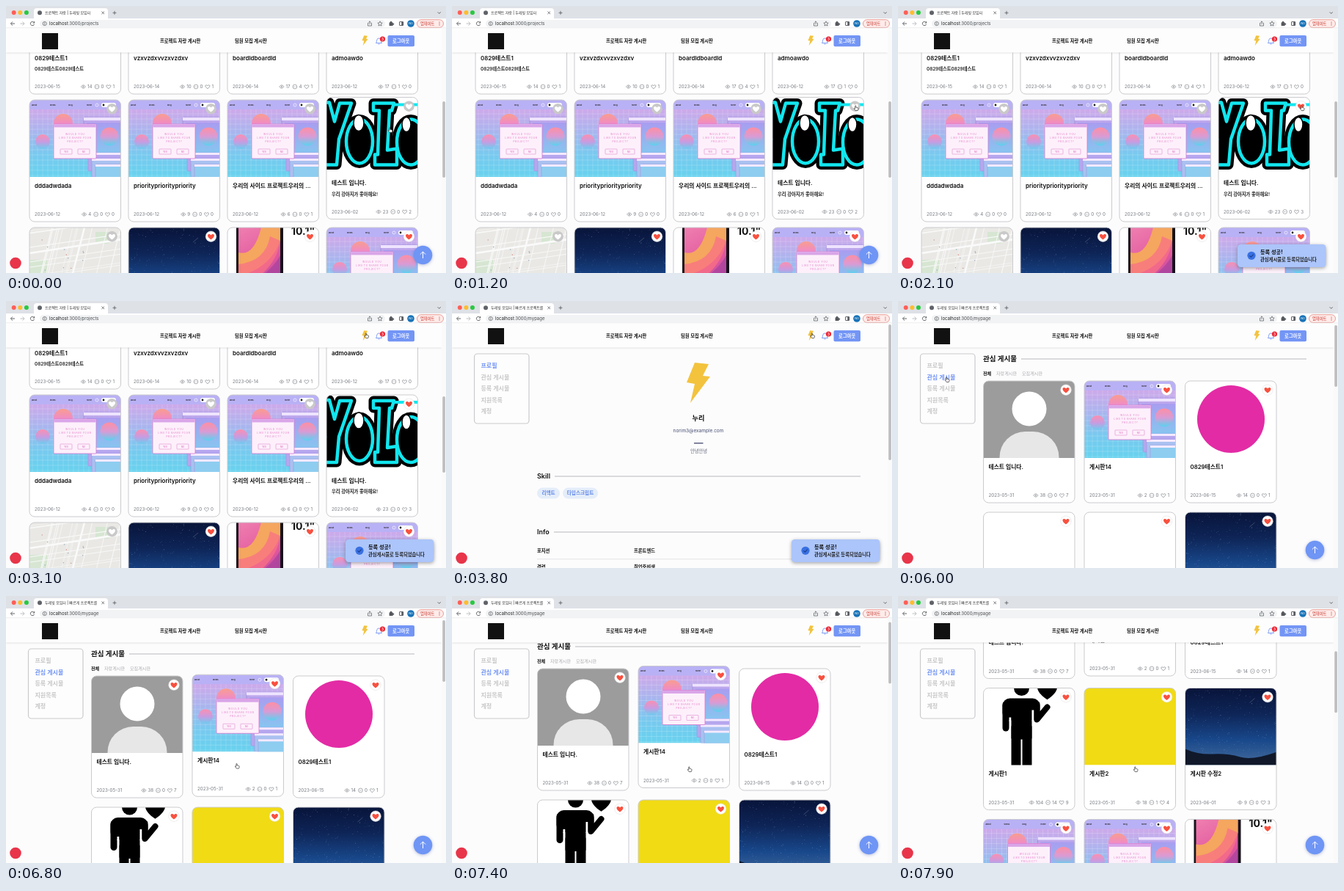
Write an HTML page with a canvas that moves like this. It is 600 by 364 pixels and loops after 8000 ms.

```html
<!DOCTYPE html>
<html lang="ko">
<head>
<meta charset="utf-8">
<title>프로젝트 자랑</title>
<style>
html, body { margin: 0; width: 100%; height: 100%; overflow: hidden; background: #fff; }
canvas { display: block; width: 600px; height: 364px; }
</style>
</head>
<body>
<canvas id="stage"></canvas>
<script>
const canvas = document.getElementById('stage');
const ratio = window.devicePixelRatio || 1;
canvas.width = 600 * ratio;
canvas.height = 364 * ratio;
const c = canvas.getContext('2d');
const FONT = 'Inter, "Noto Sans CJK KR", "Noto Sans CJK", sans-serif';
const BRAND = '두레빛 모임터';
const BLUE = '#7395f5', BORDER = '#cbcbce', INK = '#111', RED = '#f9503f';
const LOOP = 8000, LIKE = 1300, TO_PROFILE = 3500, TO_LIKES = 5500, LOADED = 6200;

// Drawing helpers
function text(s, x, y, size, color = INK, weight = 400, align = 'left') {
  c.font = `${weight} ${size}px ${FONT}`;
  c.textAlign = align;
  c.fillStyle = color;
  c.fillText(s, x, y + size * 0.36);
  return c.measureText(s).width;
}
function paint(fill, stroke, width = 1) {
  if (fill) { c.fillStyle = fill; c.fill(); }
  if (stroke) { c.strokeStyle = stroke; c.lineWidth = width; c.stroke(); }
}
function rect(x, y, w, h, fill) { c.fillStyle = fill; c.fillRect(x, y, w, h); }
function box(x, y, w, h, r, fill, stroke, width) {
  c.beginPath();
  c.roundRect(x, y, w, h, r);
  paint(fill, stroke, width);
}
function disc(x, y, r, fill, stroke, width) { oval(x, y, r, r, fill, stroke, width); }
function oval(x, y, rx, ry, fill, stroke, width) {
  c.beginPath();
  c.ellipse(x, y, rx, ry, 0, 0, Math.PI * 2);
  paint(fill, stroke, width);
}
function path(d, fill, stroke, width) {
  const p = new Path2D(d);
  if (fill) { c.fillStyle = fill; c.fill(p); }
  if (stroke) { c.strokeStyle = stroke; c.lineWidth = width || 1; c.stroke(p); }
}
function at(x, y, scale, draw) {
  c.save();
  c.translate(x, y);
  c.scale(scale, scale);
  draw();
  c.restore();
}
function gradient(y0, y1, colors, x0 = 0, x1 = 0) {
  const g = c.createLinearGradient(x0, y0, x1, y1);
  colors.forEach((color, i) => g.addColorStop(i / (colors.length - 1), color));
  return g;
}
function shadow(blur, color, dy, draw) {
  c.save();
  c.shadowBlur = blur * ratio;
  c.shadowColor = color;
  c.shadowOffsetY = dy * ratio;
  draw();
  c.restore();
}
function random(seed) {
  return () => (seed = (seed * 16807) % 2147483647) / 2147483647;
}
function heart(x, y, s, fill, stroke) {
  at(x, y, s, () => path('M0 .9C-2 -.4 -.9 -1.6 0 -.6C.9 -1.6 2 -.4 0 .9Z', fill, stroke, 0.7 / s));
}
function bolt(x, y, s) {
  at(x, y, s, () => path('M-5-27L14-25L6-9L16-8L-11 28L-5 2L-16 0Z', '#f3c33e'));
}

// Thumbnails, drawn in a 125 x 105 area
function synth() {
  rect(0, 0, 125, 105, gradient(12, 105, ['#cfa9ea', '#a9b5ee', '#78c9ef', '#67d2ee']));
  c.beginPath();
  for (let x = 4; x < 125; x += 7) { c.moveTo(x, 13); c.lineTo(x, 105); }
  for (let y = 19; y < 105; y += 7) { c.moveTo(0, y); c.lineTo(125, y); }
  paint(null, 'rgba(255,255,255,.34)', 0.5);
  rect(0, 0, 125, 13, '#b9b1f5');
  ['about', 'works', 'blog', 'home'].forEach((s, i) => text(s, 3 + i * 25, 7, 2.6, '#222', 600));
  disc(92, 7, 2, null, '#fff', 0.6);
  box(98, 4, 20, 6, 3, '#fff');
  disc(101, 7, 1.4, '#222');
  disc(46, 32, 13, gradient(19, 45, ['#f99d8e', '#f08cc4', '#83a9ee']));
  disc(18, 57, 10, gradient(47, 67, ['#fc8fb0', '#c99be0', '#6bcdf0']));
  box(74, 24, 55, 54, 1, 'rgba(190,164,237,.75)', '#9a7fd8', 0.7);
  rect(74, 24, 55, 4, '#eee4ff');
  rect(78, 31, 47, 43, gradient(31, 74, ['#a99df0', '#85c7f0']));
  disc(109, 50, 12.5, gradient(38, 62, ['#fc8fa5', '#d99bd5', '#5fd0ee']));
  for (let i = 0; i < 3; i++) {
    box(80 + i * 5, 72 + i * 8, 50, 25, 1, ['#b6a6ee', '#a9c1f0', '#8ecdf0'][i], '#a08ade', 0.5);
    rect(80 + i * 5, 72 + i * 8, 50, 3, '#f5eaff');
  }
  box(33, 33, 58, 47, 1, '#fdf0fb', '#d977cf', 0.8);
  rect(33.4, 33.4, 57.2, 4, '#d9a5e8');
  ['W O U L D   Y O U', 'L I K E  T O  S H A R E  Y O U R', 'P R O J E C T ?'].forEach((s, i) =>
    text(s, 62, 47 + i * 5, 3, '#e06fc0', 400, 'center'));
  [['YES', 42], ['NO', 66]].forEach(([s, x]) => {
    box(x, 67, 16, 7, 0.5, null, '#df8bcd', 0.6);
    text(s, x + 8, 70.5, 2.8, '#d95bb6', 400, 'center');
  });
}
function yolo() {
  rect(0, 0, 125, 105, '#fff');
  const letters = [
    'M-14 7H4L11 33L18 8H34L17 57L14 92H-6L-2 57Z',
    'M45 30A18 30 0 1 0 45 90A18 30 0 1 0 45 30Z',
    'M64 8H92L89 18H86L83 72L96 70V92H66V78H70L72 18H64Z',
    'M115 30A19 31 0 1 0 115 92A19 31 0 1 0 115 30Z'
  ];
  c.lineJoin = 'round';
  letters.forEach(d => path(d, '#000', '#000', 13));
  letters.forEach(d => path(d, '#000', '#12e6ee', 4.5));
  path('M92 10H127', null, '#12e6ee', 4);
  c.lineJoin = 'miter';
  oval(44, 35, 7, 11, '#fff', '#000', 1.5);
  oval(109, 37, 6, 10, '#fff', '#000', 1.5);
}
function map() {
  rect(0, 0, 125, 105, '#e9e8e5');
  [[0, 44, 24, 34], [90, 6, 18, 16], [64, 64, 18, 26]].forEach(b => rect(...b, '#d6e6d2'));
  const rnd = random(31);
  for (let i = 0; i < 14; i++) {
    const x = rnd() * 140, y = rnd() * 105;
    path(`M${x} 0L${x - 25} 105M0 ${y}L125 ${y - 18}`, null, '#f8f8f7', 0.5 + rnd() * 0.7);
  }
  path('M75 0L48 105M0 35L125 16', null, '#fafafa', 2.5);
  for (let i = 0; i < 18; i++) disc(rnd() * 125, rnd() * 105, 0.8, i % 3 ? '#9fb0be' : '#d69b8f');
}
function night() {
  rect(0, 0, 125, 105, gradient(0, 105, ['#08143a', '#0e2557', '#18478a', '#446b9c']));
  const rnd = random(77);
  for (let i = 0; i < 260; i++) {
    const size = 0.3 + rnd() * 0.4;
    rect(rnd() * 125, rnd() * 88, size, size, `rgba(205,224,255,${0.2 + rnd() * 0.5})`);
  }
  path('M88 20L95 14', null, 'rgba(255,255,255,.4)', 0.5);
  path('M0 83Q18 91 38 90T75 94T125 87V105H0Z', '#10182a');
}
function tablet() {
  rect(0, 0, 125, 105, '#fff');
  box(12, -8, 64, 130, 3, '#17141c');
  rect(15, 0, 57, 105, gradient(0, 105, ['#ef7fb0', '#e0559c', '#8f4aa8'], 15, 72));
  path('M15 34Q36 40 46 0H72V18Q58 56 15 66Z', '#f5a65f');
  path('M15 50Q52 46 58 12L72 18Q66 60 15 84Z', 'rgba(250,112,132,.75)');
  path('M15 84Q56 66 72 38V105H15Z', 'rgba(160,62,158,.6)');
  text('10.1"', 87, 5, 14, '#111', 700);
}
function person() {
  rect(0, 0, 125, 105, '#9c9c9c');
  disc(62.5, 38, 23.5, '#fff');
  box(22, 69, 81, 70, 37, '#e7e7e7');
}
function donor() {
  rect(0, 0, 125, 105, '#fff');
  disc(52, 0, 10.5, '#000');
  box(26, 14, 51, 30, 10, '#000');
  box(26, 18, 9, 41, 4.5, '#000');
  rect(35, 40, 3, 5, '#fff');
  box(38, 25, 28, 45, 2, '#000');
  box(38, 50, 13, 70, 3, '#000');
  box(53, 50, 13, 70, 3, '#000');
  rect(66, 30, 3, 15, '#fff');
  c.lineCap = c.lineJoin = 'round';
  path('M73 22V43L87 26', null, '#000', 8);
  c.lineCap = 'butt';
  c.lineJoin = 'miter';
  heart(87, 5, 12, '#000');
}
function magenta() {
  rect(0, 0, 125, 105, '#fff');
  disc(62.5, 52, 46, '#e32ba5');
}
function yellow() { rect(0, 0, 125, 105, '#f1db14'); }

// Cards: title, description, date, [views, comments, likes], thumbnail, liked
const PROJECTS = [
  ['0829테스트1', '0829테스트0829테스트', '2023-06-15', [14, 0, 1], null, false],
  ['vzxvzdxvvzxvzdxv', '', '2023-06-14', [10, 0, 1], null, false],
  ['boardldboardld', '', '2023-06-14', [17, 4, 1], null, false],
  ['admoawdo', '', '2023-06-12', [17, 1, 0], null, false],
  ['dddadwdada', '', '2023-06-12', [4, 0, 0], synth, false],
  ['priorityprioritypriority', '', '2023-06-12', [9, 0, 0], synth, false],
  ['우리의 사이드 프로젝트우리의 ...', '', '2023-06-12', [6, 0, 1], synth, false],
  ['테스트 입니다.', '우리 강아지가 좋아해요!', '2023-06-02', [23, 0, 2], yolo, false],
  ['', '', '', [], map, false], ['', '', '', [], night, true],
  ['', '', '', [], tablet, true], ['', '', '', [], synth, true]
];
const LIKED = [
  ['테스트 입니다.', '', '2023-05-31', [38, 0, 7], person, true],
  ['게시판14', '', '2023-05-31', [2, 0, 1], synth, true],
  ['0829테스트1', '', '2023-06-15', [14, 0, 1], magenta, true],
  ['게시판1', '', '2023-05-31', [104, 14, 9], donor, true],
  ['게시판2', '', '2023-05-31', [18, 1, 4], yellow, true],
  ['게시판 수정2', '', '2023-06-01', [9, 0, 3], night, true],
  ['', '', '', [], synth, true], ['', '', '', [], synth, true], ['', '', '', [], tablet, true]
];
const GRAY = '#777b82';
const statIcons = [
  (x, y) => at(x, y, 1, () => {
    path('M-3.2 0Q0 -4.4 3.2 0Q0 4.4 -3.2 0Z', null, GRAY, 0.6);
    disc(0, 0, 0.9, null, GRAY, 0.6);
  }),
  (x, y) => {
    disc(x, y, 2.9, null, GRAY, 0.6);
    for (let i = -1; i < 2; i++) disc(x + i * 1.3, y, 0.4, GRAY);
  },
  (x, y) => heart(x, y + 0.3, 2.6, null, GRAY)
];
function card(x, y, [title, note, date, stats, thumb, liked]) {
  c.save();
  box(x, y, 124.5, 166, 7, '#fff');
  c.clip();
  if (thumb) at(x, y, 1, () => {
    c.beginPath();
    c.rect(0, 0, 125, 105);
    c.clip();
    thumb();
  });
  c.restore();
  box(x, y, 124.5, 166, 7, null, BORDER);
  disc(x + 112.5, y + 12.2, 7.3, liked ? '#fff' : '#c9c9c9', liked ? '#ddd' : null, 0.5);
  heart(x + 112.5, y + 12.9, 4, liked ? RED : '#fff');
  text(title, x + 7, y + 117, /[가-힣]/.test(title) ? 7.8 : 8, INK, 600);
  text(note, x + 7, y + 132, 6.3, '#222', 600);
  text(date, x + 7, y + 156, 6.2, GRAY);
  let right = x + 116;
  for (let i = stats.length - 1; i >= 0; i--) {
    right -= text(stats[i], right, y + 156, 6.2, GRAY, 400, 'right') + 5.6;
    statIcons[i](right, y + 156);
    right -= 6.4;
  }
}

// Timelines
function track(keys, t, ease = k => k) {
  let i = 0;
  while (i < keys.length - 2 && t > keys[i + 1][0]) i++;
  const [a, b] = [keys[i], keys[i + 1]];
  const k = ease(Math.min(1, Math.max(0, (t - a[0]) / (b[0] - a[0]))));
  return a.slice(1).map((v, j) => v + (b[j + 1] - v) * k);
}
const smooth = k => k * k * (3 - 2 * k);
const POINTER = [[0, 524, 169], [500, 551, 139], [2100, 551, 139], [2800, 491.5, 47], [4500, 491.5, 47],
  [4700, 156.5, 60], [4900, 156.5, 60], [5400, 67, 107], [6000, 67, 107], [6900, 324, 236], [8000, 324, 236]];
const ARROW = [[2300, 2700], [4550, 5250], [6050, 6250]];
const SCROLL = [[7200, 0], [7400, 10], [7700, 110], [7900, 162.5]];

// Screens
function projects(t) {
  const [lift] = track([[0, 3.5], [2200, 3.5], [2400, 0]], t);
  PROJECTS.forEach((item, i) => {
    let data = item;
    if (i === 7 && t > LIKE) data = [...item.slice(0, 3), [23, 0, 3], item[4], true];
    card(32 + (i % 4) * 135, -46 + Math.floor(i / 4) * 174 - (i === 7 ? lift : 0), data);
  });
}
function heading(s, y, lineX, size = 9) {
  text(s, 116, y, size, INK, 600);
  rect(lineX, y - 0.6, 557 - lineX, 1.2, '#c6c6c8');
}
function profile() {
  bolt(336, 111, 1);
  text('누리', 336, 160, 9.2, INK, 700, 'center');
  text('norim3@example.com', 336, 176.5, 6.5, '#454d70', 400, 'center');
  rect(330, 193, 12.5, 1.6, '#666987');
  text('안녕안녕', 336.5, 205, 6.3, '#62667a', 500, 'center');
  heading('Skill', 239, 140);
  [['리액트', 116, 31], ['타입스크립트', 151, 48]].forEach(([s, x, w]) => {
    box(x, 254.5, w, 15, 7.5, '#e4edf9');
    text(s, x + w / 2, 262, 6.6, '#6289e8', 600, 'center');
  });
  heading('Info', 315, 139);
  [['포지션', '프론트엔드'], ['경력', '취업준비생']].forEach(([key, value], i) => {
    text(key, 116, 341 + i * 21.5, 6.3, INK, 600);
    text(value, 248, 341 + i * 21.5, 6.3, INK, 600);
  });
  rect(116, 351.5, 441, 0.8, '#dedee0');
}
function likes(t) {
  const [scroll] = track(SCROLL, t);
  const [lift] = track([[6700, 0], [6900, 3.5]], t);
  heading('관심 게시물', 79 - scroll, 168, 9.5);
  ['전체', '자랑게시판', '모집게시판'].forEach((s, i) =>
    text(s, [116, 134, 169][i], 98.5 - scroll, 6.1, i ? '#adadb0' : INK, i ? 500 : 600));
  LIKED.forEach((item, i) => {
    let data = item;
    if (t < LOADED && (i === 3 || i === 4)) data = [...item.slice(0, 4), null, true];
    card(116.5 + (i % 3) * 137.5, 109 + Math.floor(i / 3) * 179 - scroll - (i === 1 ? lift : 0), data);
  });
}
function sidebar(active) {
  box(30.5, 72, 74.5, 95, 4, '#fdfdfd', BORDER, 1.2);
  ['프로필', '관심 게시물', '등록 게시물', '지원목록', '계정'].forEach((s, i) =>
    text(s, 39.5, 88.5 + i * 15.4, 8, i === active ? BLUE : '#c8c8ca', 600));
}
function header() {
  shadow(3, 'rgba(0,0,0,.2)', 0.5, () => rect(0, 30, 594, 33.5, '#fdfdfd'));
  rect(49, 37, 22, 22, '#111');
  text('프로젝트 자랑 게시판', 210, 47.5, 6.3, INK, 600);
  text('팀원 모집 게시판', 312, 47.5, 6.3, INK, 600);
  bolt(489.5, 47, 0.25);
  path('M504.5 50.5Q505.7 49 505.7 46.5Q506 44 508.5 44Q511 44 511.3 46.5Q511.3 49 512.5 50.5ZM507.5 52H509.5', null, BLUE, 0.9);
  disc(513.5, 45, 3.6, '#ee2433');
  text('3', 513.5, 45, 4.6, '#fff', 600, 'center');
  box(520.5, 40, 36.5, 15.2, 2, BLUE);
  text('로그아웃', 538.7, 47.5, 6.3, '#fff', 600, 'center');
}
function browser(onProjects) {
  rect(0, 0, 600, 18, '#dee1e6');
  rect(0, 17, 600, 13, '#fff');
  ['#fe5f57', '#febc2e', '#28c840'].forEach((color, i) => disc(10.7 + i * 8.6, 9, 3, color));
  box(38, 3, 101, 16, [4, 4, 0, 0], '#fff');
  disc(46, 9.3, 3, '#5f6368');
  c.save();
  c.beginPath();
  c.rect(53, 3, 73, 14);
  c.clip();
  text(onProjects ? `프로젝트 자랑 | ${BRAND}` : `${BRAND} | 빠르게 프로젝트를 구하고`, 53, 9.3, 5, '#333', 500);
  c.restore();
  const line = '#55585c';
  path('M130.4 7.5L134 11.1M134 7.5L130.4 11.1M145.5 9.3H150.5M148 6.8V11.8', null, line, 0.8);
  path('M588.7 8.3L590.7 10.3L592.7 8.3', null, line, 0.9);
  path('M12 24H6.5M9 21.4L6.4 24L9 26.6', null, line, 0.9);
  path('M19.5 24H25M22.5 21.4L25.1 24L22.5 26.6', null, '#b6b8bb', 0.9);
  path('M38.3 22.5A2.7 2.7 0 1 0 38.6 24.8M38.7 21V23.1H36.6', null, line, 0.9);
  box(46, 19, 471, 10, 5, '#f1f3f4');
  disc(52.7, 24, 2.6, null, line, 0.7);
  rect(52.3, 23.5, 0.8, 2, line);
  rect(52.3, 22.3, 0.8, 0.7, line);
  const host = text('localhost', 59, 24, 6, '#222');
  text(onProjects ? ':3000/projects' : ':3000/mypage', 59 + host, 24, 6, '#4b4e52');
  path('M494.5 23.3H493.5V27H498.5V23.3H497.5M496 25.2V20.9M494.6 22.2L496 20.8L497.4 22.2', null, line, 0.7);
  path('M510 20.8L511 23L513.2 23.2L511.5 24.7L512 27L510 25.8L508 27L508.5 24.7L506.8 23.2L509 23Z', null, line, 0.7);
  box(522.6, 22.3, 5, 4.8, 0.7, line);
  disc(525, 22, 1.2, line);
  disc(528, 24.6, 1.2, line);
  box(536.5, 21.5, 5.2, 5, 0.5, null, line, 0.9);
  rect(539.3, 21.5, 2.4, 5, line);
  disc(552, 24, 4.8, '#1873b8');
  text('No', 552, 24, 4, '#fff', 400, 'center');
  box(560.5, 18.7, 36, 10.7, 5.3, '#fdecea', '#e5857d', 0.8);
  text('업데이트', 565, 24, 5.3, '#c5281f', 500);
  for (let i = -1; i < 2; i++) disc(591, 24 + i * 2, 0.6, '#c5281f');
  rect(0, 29.6, 600, 0.5, '#dcdde0');
}
function scrollbar(y, h) {
  rect(594, 30, 6, 334, '#fafafa');
  box(595.3, y, 3.6, h, 1.8, '#bdbdbf');
}
function floating(t) {
  disc(13, 350.5, 7.8, '#e8354a');
  shadow(4, 'rgba(60,80,150,.35)', 1, () => disc(568.5, 339.5, 12.8, '#6f95f5'));
  path('M568.5 344V335.2M564.8 338.7L568.5 335L572.2 338.7', null, '#fff', 1);
  const [show] = track([[1400, 0], [1700, 1], [4100, 1], [4400, 0]], t, smooth);
  if (!show) return;
  c.save();
  c.globalAlpha = show;
  c.translate((1 - show) * 40, 0);
  shadow(5, 'rgba(0,0,0,.35)', 1.5, () => box(463, 325, 120.5, 31, 4.5, '#acc5fa'));
  disc(482, 340.3, 5.6, '#3970e2');
  path('M479.4 340.4L481.4 342.3L484.7 338.5', null, '#173a80', 1.1);
  text('등록 성공!', 494, 335, 7.2, INK, 700);
  text('관심게시물로 등록되었습니다', 494, 345.3, 6.3, '#222', 600);
  c.restore();
}
function pointer(t) {
  const [x, y] = track(POINTER, t, smooth);
  const arrow = ARROW.some(([a, b]) => t >= a && t < b);
  c.lineJoin = 'round';
  at(x, y, arrow ? 1 : 0.85, () => arrow
    ? path('M0 0V7L1.6 5.6L2.7 8L3.9 7.4L2.8 5.1H5Z', '#000', '#fff', 0.6)
    : path('M-1.5-3.3Q-.8-4.3-.1-3.3V-.6Q.8-1.2 1.3-.4Q2-.8 2.5 0Q3.5-.2 3.5 .9V2.2L2.6 4.2H-1L-3.4 .8Q-3-.2-1.5 .9Z', '#fff', '#111', 0.7));
  c.lineJoin = 'miter';
}

function frame(now) {
  const t = Math.floor((now % LOOP) / 100) * 100;
  c.setTransform(ratio, 0, 0, ratio, 0, 0);
  rect(0, 0, 600, 364, '#fcfcfd');
  const onProjects = t < TO_PROFILE, onLikes = t >= TO_LIKES;
  if (onProjects) projects(t);
  else if (onLikes) likes(t);
  else profile();
  if (!onProjects) sidebar(onLikes ? 1 : 0);
  header();
  if (onProjects) scrollbar(130, 104);
  else if (onLikes) scrollbar(33 + track(SCROLL, t)[0] * 0.26, 84);
  else scrollbar(32, 185);
  browser(onProjects);
  floating(t);
  pointer(t);
  requestAnimationFrame(frame);
}
requestAnimationFrame(frame);
</script>
</body>
</html>
```
